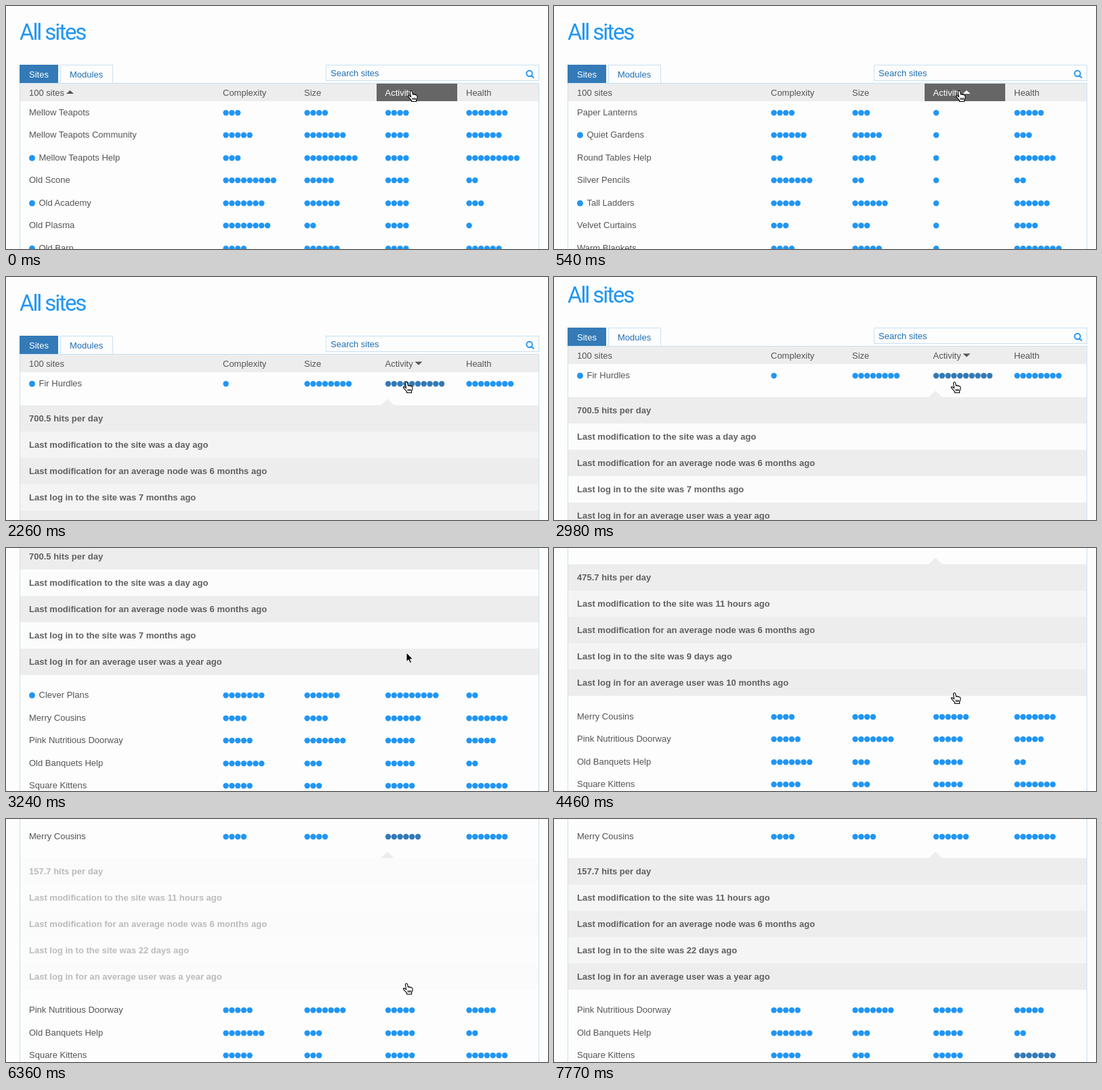
These frames come from a looping animation (800 by 360 pixels, 8.16 s). An HTML page:

```html
<!DOCTYPE html>
<html lang="en">
<head>
<meta charset="utf-8">
<title>All sites</title>
<style>
html, body { margin: 0; width: 100%; height: 100%; overflow: hidden; background: #fdfdfd; }
svg { display: block; width: 800px; height: 360px; font: 13px "Liberation Sans", Arial, sans-serif; fill: #555; }
.title { font: 33px Roboto, sans-serif; letter-spacing: -2.1px; fill: #2196f3; }
.link { fill: #1f6fb2; }
.line { fill: none; stroke: #c8e1f2; }
.dot { fill: #2196f3; }
.dot.on { fill: #337ab7; }
.bold { font-weight: bold; fill: #606060; }
</style>
</head>
<body>
<svg id="stage" viewBox="0 0 800 360"></svg>
<script>
const LOOP = 8160, STEP = 33.5, PANEL = 224, BAND = 39;
const COLS = [['Complexity', 320, 308], ['Size', 440, 428], ['Activity', 559.5, 547], ['Health', 679, 666]];

// "*" marks a site with a leading dot; numbers are scores per column
const byName = [
  ['Mellow Teapots', 3, 4, 4, 7],
  ['Mellow Teapots Community', 5, 7, 4, 6],
  ['*Mellow Teapots Help', 3, 9, 4, 9],
  ['Old Scone', 9, 5, 4, 2],
  ['*Old Academy', 7, 6, 4, 3],
  ['Old Plasma', 8, 2, 4, 1],
  ['*Old Barn', 4, 6, 4, 6]
];
const leastActive = [
  ['Paper Lanterns', 4, 3, 1, 5],
  ['*Quiet Gardens', 6, 5, 1, 3],
  ['Round Tables Help', 2, 4, 1, 7],
  ['Silver Pencils', 7, 2, 1, 2],
  ['*Tall Ladders', 5, 6, 1, 6],
  ['Velvet Curtains', 3, 3, 1, 4],
  ['Warm Blankets', 4, 5, 1, 8]
];
const mostActive = [
  ['*Fir Hurdles', 1, 8, 10, 8],
  ['*Clever Plans', 7, 6, 9, 2],
  ['Merry Cousins', 4, 4, 6, 7],
  ['Pink Nutritious Doorway', 5, 7, 5, 5],
  ['Old Banquets Help', 7, 3, 5, 2],
  ['Square Kittens', 5, 3, 5, 7],
  ['*Antique Vans', 2, 6, 5, 7]
];
// hits, site change, site log in, user log in
const details = [
  ['700.5', 'a day', '7 months', 'a year'],
  ['475.7', '11 hours', '9 days', '10 months'],
  ['157.7', '11 hours', '22 days', 'a year']
];
const SCROLL = [0, 12, 58, 118, 170, 197, 198, 199];

// Number of steps taken at time t, of n spread evenly from a to b
const steps = (t, a, b, n) =>
  t < a ? 0 : Math.min(n, Math.floor((t - a) / (b - a) * (n - 1) + .12) + 1);
const mix = (a, b, u) => a + (b - a) * u;

const text = (x, y, s, attr = '') => `<text x="${x}" y="${y}" ${attr}>${s}</text>`;
const rect = (x, y, w, h, attr) => `<rect x="${x}" y="${y}" width="${w}" height="${h}" ${attr}/>`;
const path = (d, attr = '') => `<path d="${d}" ${attr}/>`;
const dot = (x, y, r, on) => `<circle class="dot${on ? ' on' : ''}" cx="${x}" cy="${y}" r="${r}"/>`;

function pointer(t) {
  if (t >= 7430) {
    const u = steps(t, 7430, 7770, 7) / 7;
    const bend = (a, b, c) => mix(mix(a, b, u), mix(b, c, u), u);
    return [bend(591, 700, 748), bend(243, 250, 364)];
  }
  const u = steps(t, 1610, 1780, 4) / 4;
  return [mix(598, 591, u),
    mix(125, 155, u) + 59 * steps(t, 3680, 3980, 6) / 6 + 29 * steps(t, 5360, 5530, 4) / 4];
}

function cursor(x, y, arrow) {
  const shape = arrow
    ? path('M0 0V13.5L3.2 10.6L5.3 15.6L7.6 14.6L5.5 9.8H9.8Z', 'fill="#000" stroke="#fff"')
    : path('M-1.5 2Q0-1 1.6 2L2.6 6.2Q4 5 5 6.4Q6.5 5.6 7.2 7Q9 6.6 9 8.6Q9.4 12 7.6 14V16.5H.6V15L-4 9.6Q-5.5 7.6-3.4 7.6L-.4 9.6Z' +
        'M2.4 11V14M4.4 11V14M6.3 11V14', 'fill="#fff" stroke="#000" stroke-width="1.1"');
  return `<g transform="translate(${x.toFixed(1)} ${y.toFixed(1)})">${shape}</g>`;
}

function header(t, hot) {
  const up = x => path(`M${x} 130h11l-5.5-5z`, hot && x > 500 ? 'fill="#fff"' : '');
  let s = text(20, 50, 'All sites', 'class="title"')
    + rect(20, 87, 57, 28, 'fill="#337ab7"') + text(34, 106, 'Sites', 'fill="#fff"')
    + rect(80.5, 87.5, 77, 27, 'class="line"') + text(94, 106, 'Modules', 'class="link"')
    + rect(472.5, 87.5, 314, 23, 'class="line"') + text(479, 104, 'Search sites', 'class="link"')
    + path('M775.6 103.1l3.6 3.6M776.8 100a4.2 4.2 0 1 1-8.4 0a4.2 4.2 0 1 1 8.4 0', 'fill="none" stroke="#2196f3" stroke-width="1.9"')
    + path('M20.5 1200V114.5H786.5V1200', 'class="line"')
    + rect(21, 115, 765, 26, 'fill="#ededed"')
    + text(34, 133, '100 sites');
  if (hot) s += rect(547, 115, 119, 26, 'fill="#666"');
  COLS.forEach(([name, x], i) => s += text(x, 133, name, hot && i == 2 ? 'fill="#fff"' : ''));
  if (t < 540) return s + up(89);
  if (t < 1380) return s + up(603.5);
  return s + path('M603.5 125.5h11l-5.5 5z', hot ? 'fill="#fff"' : '');
}

function panel(y, [hits, site, login, user], alpha, odd) {
  const lines = [
    `${hits} hits per day`,
    `Last modification to the site was ${site} ago`,
    'Last modification for an average node was 6 months ago',
    `Last log in to the site was ${login} ago`,
    `Last log in for an average user was ${user} ago`
  ];
  return path(`M553 ${y}l10-9.5l10 9.5z`, 'fill="#ededed"') + lines.map((line, i) =>
    rect(21, y + BAND * i, 765, BAND, `fill="${i % 2 ? odd : '#ededed'}" opacity="${alpha * alpha}"`)
    + text(34, y + BAND * i + 24, line, `class="bold" opacity="${alpha}"`)).join('');
}

function draw(t) {
  const [px, py] = pointer(t);
  const scroll = SCROLL[steps(t, 2980, 3380, 7)];
  const rows = t < 540 ? byName : t < 1380 ? leastActive : mostActive;
  const open = t < 2260 ? -1 : t < 4460 ? 0 : t < 6130 ? 1 : 2;
  const settled = t >= [2680, 4880, 6710][open];
  const odd = !settled ? '#f4f4f4' : open ? '#f5f5f5' : '#fcfcfc';
  const alpha = open == 2 ? Math.min(1, Math.max(0, Math.floor((t - 6130) / 57.5) / 6)) ** 2.2 : 1;
  const hot = py < 141 && !scroll;
  const held = t >= 6130 && t < 7430;   // hover lingers until the pointer moves
  let hover = hot, body = '';

  rows.forEach(([label, ...scores], r) => {
    const y = Math.floor(158 + STEP * r - scroll + (open >= 0 && r > open ? PANEL : 0));
    const star = label[0] == '*';
    if (star) body += dot(38.5, y + .3, 4.5);
    body += text(star ? 48.5 : 34, y + 4, label.slice(star));
    scores.forEach((n, c) => {
      const left = COLS[c][2];
      const on = held ? r == 2 && c == 2
        : Math.abs(py - y) < 17 && px >= left && px < left + 120;
      hover ||= on;
      for (let i = 0; i < n; i++) body += dot(COLS[c][1] + 4.6 + 8.78 * i, y + .3, 4.2, on);
    });
    if (r == open) body += panel(y + 32, details[r], alpha, odd);
  });

  const arrow = !hover && (t >= 3040 && t < 4460 || t >= 7430);
  return `<g transform="translate(0 ${-scroll})">${header(t, hot)}</g>${body}${cursor(px, py, arrow)}`;
}

const stage = document.getElementById('stage');
let shown, start;
function tick(now) {
  start ??= now;
  const next = draw((now - start) % LOOP);
  if (next != shown) stage.innerHTML = shown = next;
  requestAnimationFrame(tick);
}
requestAnimationFrame(tick);
</script>
</body>
</html>
```
